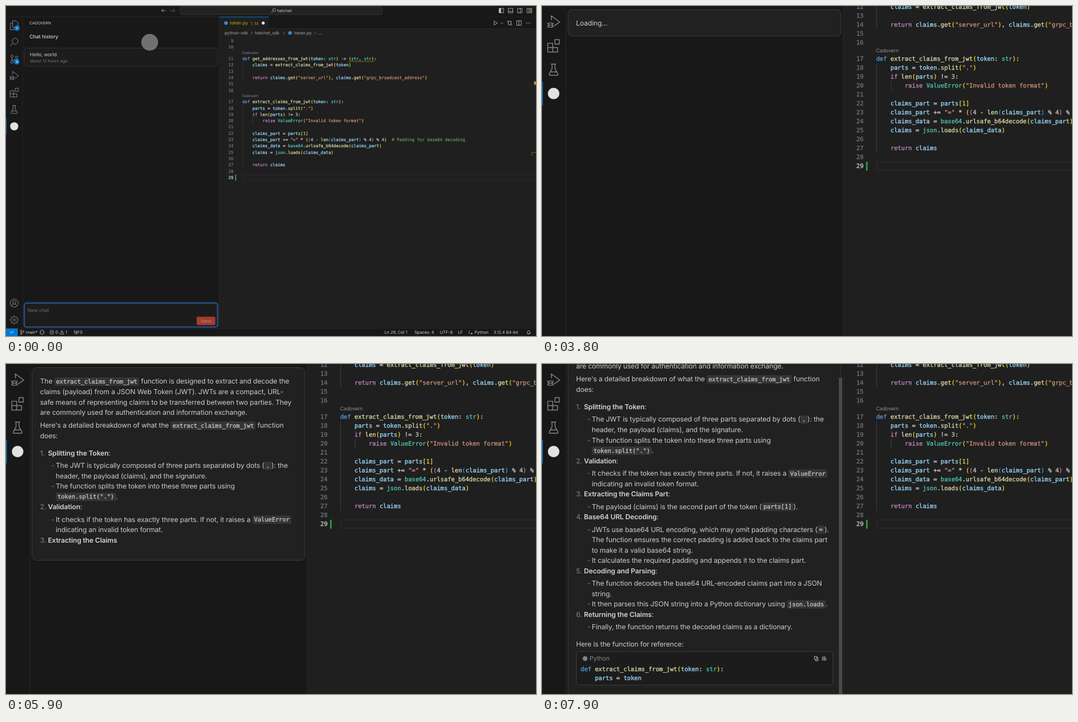
Animation, 948 px wide and 591 px high, one loop 8000 ms. Source, as an HTML page with a canvas:

```html
<!DOCTYPE html>
<html lang="en">
<head>
<meta charset="utf-8">
<title>Editor chat</title>
<style>
  html, body { margin: 0; width: 100%; height: 100%; overflow: hidden; background: #181818; }
  canvas { display: block; }
</style>
</head>
<body>
<canvas id="stage" width="948" height="591"></canvas>
<script>
const W = 948, H = 591, LOOP = 8000, STEP = 100;
const CUT = 3700, ANSWER = 3900;
const out = document.getElementById('stage').getContext('2d');
const buf = document.createElement('canvas');
buf.width = W;
buf.height = H;
const ctx = buf.getContext('2d');

const UI = 'Inter, "Open Sans", sans-serif';
const MONO = '"DejaVu Sans Mono", monospace';
const BRAND = 'Cadovern';
const BLUE = '#0078d4', LINE = '#2b2b2b', DIM = '#868686', TEXT = '#cccccc';

const clamp = v => Math.max(0, Math.min(1, v));

// Linear value at time t from [time, value] pairs
function track(t, keys) {
  if (t <= keys[0][0]) return keys[0][1];
  for (let i = 1; i < keys.length; i++) {
    const [a, va] = keys[i - 1], [b, vb] = keys[i];
    if (t <= b) return va + (vb - va) * (t - a) / (b - a);
  }
  return keys[keys.length - 1][1];
}

/* ---------- drawing helpers ---------- */

function rect(x, y, w, h, color) {
  ctx.fillStyle = color;
  ctx.fillRect(x, y, w, h);
}

function box(x, y, w, h, r, fill, stroke, lw = 1) {
  ctx.beginPath();
  ctx.roundRect(x, y, w, h, r);
  if (fill) { ctx.fillStyle = fill; ctx.fill(); }
  if (stroke) { ctx.strokeStyle = stroke; ctx.lineWidth = lw; ctx.stroke(); }
}

function dot(x, y, r, color) {
  ctx.beginPath();
  ctx.arc(x, y, r, 0, 7);
  ctx.fillStyle = color;
  ctx.fill();
}

// Text centred vertically on y; returns its width
function text(str, x, y, size, color = TEXT, { weight = 400, mono = false, align = 'left' } = {}) {
  ctx.font = `${weight} ${size}px ${mono ? MONO : UI}`;
  ctx.letterSpacing = mono ? '0px' : `${-0.01 * size}px`;
  ctx.textRendering = 'geometricPrecision';
  ctx.textAlign = align;
  ctx.fillStyle = color;
  ctx.fillText(str, x, y + size * 0.36);
  if (mono) {
    // a hairline outline gives code its slightly heavier look
    ctx.strokeStyle = color;
    ctx.lineWidth = size * 0.03;
    ctx.strokeText(str, x, y + size * 0.36);
  }
  return ctx.measureText(str).width;
}

const circ = (x, y, r) => `M${x - r} ${y}a${r} ${r} 0 1 0 ${2 * r} 0a${r} ${r} 0 1 0 ${-2 * r} 0`;

function icon(d, x, y, color = DIM, lw = 1, scale = 1) {
  ctx.save();
  ctx.translate(x, y);
  ctx.scale(scale, scale);
  ctx.strokeStyle = color;
  ctx.lineWidth = lw / scale;
  ctx.lineJoin = 'round';
  ctx.stroke(new Path2D(d));
  ctx.restore();
}

function gearPath() {
  let d = '';
  for (let i = 0; i < 32; i++) {
    const r = i % 4 < 2 ? 7.2 : 5.3, a = (i - 0.5) * Math.PI / 16;
    d += `${i ? 'L' : 'M'}${r * Math.cos(a)} ${r * Math.sin(a)}`;
  }
  return d + 'Z' + circ(0, 0, 2);
}

const ICON = {
  files: 'M-2.5 -7H3L6 -4V3.5H-2.5ZM-2.5 -3.5H-6V7H2.5V3.5',
  search: circ(1.5, -1.5, 4.7) + 'M-2 2L-6.5 6.5',
  git: circ(-3.5, -4.5, 2) + circ(4, -2.5, 2) + circ(-3.5, 5, 2) + 'M-3.5 -2.5V3M4 -.5C4 2.5 -3 .5 -3.5 3',
  debug: 'M-2.5 -2V-7L7 0L.5 4.5' + circ(-3.5, 3.5, 2.6) + 'M-6 3.5H-1M-7.2 1L-5.5 2M-7.2 6L-5.5 5M.2 1L-1.5 2M.2 6L-1.5 5',
  blocks: 'M-6.5 -3H-1V2H4.5V7H-6.5ZM-1 2V7M-6.5 2H-1M1.5 -7H6.5V-2H1.5Z',
  beaker: 'M-2.8 -6.3H2.8M-1.7 -6.3V-1L-5 5Q-5.3 6.3 -4 6.3H4Q5.3 6.3 5 5L1.7 -1V-6.3M-3.4 2.5H3.4',
  user: circ(0, 0, 7.2) + circ(0, -1.4, 3) + 'M-4.6 5.5C-3.6 .4 3.6 .4 4.6 5.5',
  gear: gearPath(),
  left: 'M4 0H-4M-1 -3L-4 0L-1 3',
  right: 'M-4 0H4M1 -3L4 0L1 3',
  lens: circ(1, -1, 2.6) + 'M-1 1L-4 4',
  chevron: 'M-1.3 -2.6L1.3 0L-1.3 2.6',
  down: 'M-2 -1L0 1L2 -1',
  panel: 'M-4 -4H4V4H-4Z',
  branch: circ(-2, -2.8, 1.2) + circ(2.3, -1.6, 1.2) + circ(-2, 3, 1.2) + 'M-2 -1.6V1.8M2.3 -.4C2 1.4 -1.6 .2 -2 1.8',
  sync: 'M-3.2 -.6A3.2 3.2 0 0 1 3.2 -.6M3.2 .6A3.2 3.2 0 0 1 -3.2 .6M1.8 -1L3.2 .4L4.4 -1M-1.8 1L-3.2 -.4L-4.4 1',
  error: circ(0, 0, 3.5) + 'M-1.4 -1.4L1.4 1.4M1.4 -1.4L-1.4 1.4',
  warn: 'M0 -3.4L3.8 3.4H-3.8ZM0 -1.2V1.2M0 2V2.6',
  tower: circ(0, -1, .8) + 'M0 0L-2 3.8M0 0L2 3.8M-1.2 2.2H1.2M-1.8 .8A2.4 2.4 0 0 1 -1.8 -2.8M1.8 .8A2.4 2.4 0 0 0 1.8 -2.8M-3 2A4 4 0 0 1 -3 -3.8M3 2A4 4 0 0 0 3 -3.8',
  remote: 'M-2.8 -1.6L-.4 .6L-2.8 2.8M2.8 -2.8L.4 -.6L2.8 1.6',
  bell: 'M-3 2.2C-2 1 -2.4 -3 0 -3.2C2.4 -3 2 1 3 2.2ZM-.8 3.4H.8',
  play: 'M-2.8 -3.6L3.2 0L-2.8 3.6Z',
  compare: circ(-2.5, -2.8, 1.2) + circ(2.5, 2.8, 1.2) + 'M-2.5 -1.5V3H.5M2.5 1.5V-3H-.5',
  copy: 'M-3 -4H1V1.5H-3ZM-1 1.5V4H3V-2H1',
  insert: 'M-3 -3.5V3.5M-1.5 -2.5H2M-1.5 0H3.5M-1.5 2.5H3.5'
};

/* ---------- code ---------- */

const CODE = `

def get_addresses_from_jwt(token: str) -> (str, str):
    claims = extract_claims_from_jwt(token)

    return claims.get("server_url"), claims.get("grpc_broadcast_address")


def extract_claims_from_jwt(token: str):
    parts = token.split(".")
    if len(parts) != 3:
        raise ValueError("Invalid token format")

    claims_part = parts[1]
    claims_part += "=" * ((4 - len(claims_part) % 4) % 4)  # Padding for base64 decoding
    claims_data = base64.urlsafe_b64decode(claims_part)
    claims = json.loads(claims_data)

    return claims

`.split('\n');

const TOKEN = /(#.*)|("[^"]*")|\b(def)\b|\b(return|if|raise)\b|\b(str|ValueError|base64|json)\b|(\w+)(?=\()|(\b\d+)|(\w+)|([()[\]])|(\S)/g;
const HUES = ['#6a9955', '#ce9178', '#569cd6', '#c586c0', '#4ec9b0', '#dcdcaa', '#b5cea8', '#9cdcfe', '', '#d4d4d4'];
const BRACKETS = ['#ffd700', '#da70d6', '#179fff'];
const CODE_SIZE = 7.53;

function codeLine(line, x, y, size) {
  let depth = 0;
  for (const m of line.matchAll(TOKEN)) {
    const kind = m.slice(1).findIndex(g => g !== undefined);
    let hue = HUES[kind];
    if (kind === 8) hue = BRACKETS['(['.includes(m[0]) ? depth++ : --depth];
    text(m[0], x + m.index * size * 0.602, y, size, hue, { mono: true });
  }
}

const lineY = n => n < 11 ? 62.4 + (n - 9) * 11.32
  : n < 17 ? 94.3 + (n - 11) * 11.32
  : 171.5 + (n - 17) * 11.32;

function editor() {
  rect(381, 19.5, W - 381, 558, '#1f1f1f');
  rect(470, 19.5, W - 470, 21, '#181818');
  rect(470, 40, W - 470, 0.7, LINE);
  rect(380.6, 19.5, 0.7, 558, LINE);
  rect(381, 19.2, 89, 1, BLUE);

  dot(393.5, 30.5, 3.3, '#3f86c0');
  text('token.py', 400.5, 30.5, 8.1, '#cca700');
  text('1, M', 437.5, 30.8, 7.5, '#a58a1c');
  dot(460, 30.5, 2.7, '#e4e4e4');
  icon(ICON.play, 876, 30.5, TEXT, 0.8);
  icon(ICON.down, 887, 30.8, TEXT, 0.7);
  icon(ICON.compare, 901, 30.5, TEXT, 0.8);
  icon(ICON.panel + 'M0 -4V4', 917.5, 30.5, TEXT, 0.8);
  for (const x of [931, 934, 937]) dot(x, 30.5, 0.7, TEXT);

  const crumb = '#a0a0a0';
  text('python-sdk', 391, 48.3, 7.9, crumb);
  text('hatchet_sdk', 445, 48.3, 7.9, crumb);
  text('token.py', 515.5, 48.3, 7.9, crumb);
  text('...', 558, 48.3, 7.9, crumb);
  for (const x of [439.5, 497.5, 553]) icon(ICON.chevron, x, 48.5, '#888', 0.8);
  dot(508, 48.3, 3.3, '#3f86c0');

  ctx.strokeStyle = '#2d2d2d';
  ctx.lineWidth = 0.8;
  ctx.strokeRect(423.4, 302.2, W, 10.6);
  for (const [x, a, b] of [[422.9, 12, 14], [422.9, 18, 27], [441.2, 20, 20]])
    rect(x, lineY(a) - 5.6, 0.7, lineY(b) - lineY(a) + 11.3, '#404040');

  text(BRAND, 422.5, 84, 6.35, '#8f8f8f');
  text(BRAND, 422.5, 161.2, 6.35, '#8f8f8f');
  CODE.forEach((line, i) => {
    const n = i + 9, y = lineY(n);
    text(n, 406.7, y, CODE_SIZE, n === 29 ? '#d0d0d0' : '#6e7681', { mono: true, align: 'right' });
    codeLine(line, 422.6, y, CODE_SIZE);
  });
  rect(409.9, 301.9, 1.9, 11.2, '#2ea043');

  ctx.beginPath();
  for (let x = 613; x <= 658.5; x += 0.5) ctx.lineTo(x, 99.4 + 0.8 * Math.sin((x - 613) * 1.6));
  ctx.strokeStyle = '#cca700';
  ctx.lineWidth = 0.7;
  ctx.stroke();

  rect(944.5, 135, 3.5, 6, '#b8932b');
  rect(940, 262, 8, 1, '#3d7a4a');
  rect(940, 263, 1, 6, '#3d7a4a');
}

/* ---------- window frame ---------- */

function titleBar() {
  rect(0, 19.2, W, 0.7, LINE);
  icon(ICON.left, 282, 8.2, '#a8a8a8', 0.9);
  icon(ICON.right, 298, 8.2, '#666', 0.9);
  box(311.5, 1, 361.5, 14.3, 3.5, '#222222', '#3a3a3a', 0.8);
  icon(ICON.lens, 478.5, 8.2, '#b5b5b5', 0.8);
  text('hatchet', 485, 8.2, 7.5, '#c0c0c0');
  icon(ICON.panel + 'M-1 -4V4', 886, 8.2, TEXT, 0.8);
  rect(882, 4.2, 3, 8, TEXT);
  icon(ICON.panel + 'M-4 1.5H4', 902.5, 8.2, TEXT, 0.8);
  icon(ICON.panel + 'M1 -4V4', 919, 8.2, TEXT, 0.8);
  icon('M-4 -4H-.5V4H-4ZM1.5 -4H4.5V-1H1.5ZM1.5 1H4.5V4H1.5Z', 936, 8.2, TEXT, 0.8);
}

function badge(n, x, y) {
  dot(x, y, 5, BLUE);
  text(n, x, y, 5.8, '#fff', { weight: 600, align: 'center' });
}

function activityBar() {
  rect(29.7, 19.5, 0.6, 558, LINE);
  ['files', 'search', 'git', 'debug', 'blocks', 'beaker'].forEach((name, i) =>
    icon(ICON[name], 14.6, 34.5 + i * 30.15, DIM, 1, 1.12));
  badge('1', 19.5, 39.5);
  badge('3', 19.2, 99.7);
  rect(0, 200.5, 1, 30, BLUE);
  dot(14.7, 215.5, 7.3, '#e2e2e2');
  icon(ICON.user, 14.7, 532, DIM, 1);
  icon(ICON.gear, 14.7, 562.3, DIM, 1);
}

function statusBar() {
  const y = 584.3;
  rect(0, 577.3, W, 14, '#181818');
  rect(0, 577.3, W, 0.6, LINE);
  rect(0, 577.5, 21, 14, BLUE);
  icon(ICON.remote, 10.3, y, '#fff', 0.7);
  icon(ICON.branch, 29, y, TEXT, 0.7);
  icon(ICON.sync, 64.5, y, TEXT, 0.8);
  icon(ICON.error, 82, y, TEXT, 0.7);
  icon(ICON.warn, 100, y, TEXT, 0.7);
  icon(ICON.tower, 126, y, TEXT, 0.7);
  for (const [s, x] of [['main*', 35.8], ['0', 88.3], ['1', 106.3], ['0', 132],
    ['Ln 29, Col 1', 677], ['Spaces: 4', 730.5], ['UTF-8', 776], ['LF', 808.5],
    ['Python', 838], ['3.12.4 64-bit', 872]]) text(s, x, y, 7.6);
  text('{', 827, y - 0.5, 7.6);
  dot(833, 586.5, 1.2, TEXT);
  icon(ICON.bell, 935, y, TEXT, 0.8);
}

/* ---------- chat history and prompt ---------- */

const PROMPT = 'Tell me what extract_claims_from_jwt function does';

function history(t) {
  text(BRAND.toUpperCase(), 42, 30.5, 7, TEXT);
  text('Chat history', 42, 54.7, 9, '#d4d4d4', { weight: 500 });
  box(32.5, 75.3, 345.3, 32.7, 5, '#1c1c1c', '#3a3a3a', 0.8);
  text('Hello, world', 42.8, 87, 8.7, TEXT);
  text('about 13 hours ago', 42.8, 98.5, 7.6, '#747474');

  box(30.7, 529.8, 349.8, 47.4, 6.5, null, '#333', 0.5);
  box(32.7, 532, 345.7, 42.9, 4.5, '#1c1c1c', '#284f87', 2.3);

  const n = Math.floor(track(t, [[150, 0], [1300, 16], [2900, 38], [3600, 50]]));
  if (n) {
    const w = text(PROMPT.slice(0, n), 38.9, 544.7, 8.7, TEXT);
    rect(39.4 + w, 539.5, 0.7, 10, '#e0e0e0');
  } else {
    text('New chat', 38.5, 544.7, 8.7, '#6f6f6f');
  }
  box(341, 556.5, 33.4, 15, 2, n ? '#f4513a' : '#a23c2e');
  text('Send', 357.7, 564.2, 7.5, n ? '#ffe9e4' : '#c98d84', { align: 'center' });

  const fade = 1 - clamp((t - 100) / 300);
  dot(257, 65, 15, `rgba(135,135,135,${0.8 * fade})`);
}

/* ---------- streamed answer ---------- */

// kind: p paragraph, h heading, s list entry, c its next line, l code header, k code
const ROWS = [
  ['p', 'The `extract_claims_from_jwt` function is designed to extract and decode the'],
  ['p', 'claims (payload) from a JSON Web Token (JWT). JWTs are a compact, URL-'],
  ['p', 'safe means of representing claims to be transferred between two parties. They'],
  ['p', 'are commonly used for authentication and information exchange.'],
  ['p', "Here's a detailed breakdown of what the `extract_claims_from_jwt` function", 23],
  ['p', 'does:'],
  ['h', 'Splitting the Token:', 31],
  ['s', 'The JWT is typically composed of three parts separated by dots (`.`): the'],
  ['c', 'header, the payload (claims), and the signature.'],
  ['s', 'The function splits the token into these three parts using'],
  ['c', '`token.split(".")`.'],
  ['h', 'Validation:'],
  ['s', 'It checks if the token has exactly three parts. If not, it raises a `ValueError`'],
  ['c', 'indicating an invalid token format.'],
  ['h', 'Extracting the Claims Part:'],
  ['s', 'The payload (claims) is the second part of the token (`parts[1]`).'],
  ['h', 'Base64 URL Decoding:'],
  ['s', 'JWTs use base64 URL encoding, which may omit padding characters (`=`).'],
  ['c', 'The function ensures the correct padding is added back to the claims part'],
  ['c', 'to make it a valid base64 string.'],
  ['s', 'It calculates the required padding and appends it to the claims part.'],
  ['h', 'Decoding and Parsing:'],
  ['s', 'The function decodes the base64 URL-encoded claims part into a JSON'],
  ['c', 'string.'],
  ['s', 'It then parses this JSON string into a Python dictionary using `json.loads`.'],
  ['h', 'Returning the Claims:'],
  ['s', 'Finally, the function returns the decoded claims as a dictionary.'],
  ['p', 'Here is the function for reference:', 31],
  ['l', 'Python', 25.5],
  ['k', 'def extract_claims_from_jwt(token: str):', 19.5],
  ['k', '    parts = token', 16]
];
const TOPS = [];
ROWS.forEach(([, , gap], i) => {
  const step = gap || (i && ROWS[i - 1][0] === 'h' ? 22.4 : 18.57);
  TOPS.push(i ? TOPS[i - 1] + step : 31);
});
const SIZE = 12.3, CHIP = 10.5, GREY = '#858585';
const ROW_KEYS = [[ANSWER, 0], [4750, 4.2], [5200, 8], [6300, 18.5], [6600, 20.188], [7200, 26], [7900, 31]];

function rich(str, x, y) {
  str.split('`').forEach((part, i) => {
    if (!part) return;
    if (i % 2) {
      const w = part.length * CHIP * 0.602 + 6.4;
      box(x, y - 7, w, 15, 3, '#353535');
      text(part, x + 3.2, y + 0.3, CHIP, '#c4c4c4', { mono: true });
      x += w;
    } else {
      x += text(part, x, y, SIZE);
    }
  });
}

// Cut at the end of the word being written
function written(str, part) {
  if (part >= 1) return str;
  const n = Math.round(str.length * part);
  const end = str.indexOf(' ', n);
  return n ? str.slice(0, end < 0 ? str.length : end) : '';
}

function answer(t) {
  if (t < ANSWER) {
    box(46.5, 6.5, 488.5, 47.5, 8, '#212121', '#3d3d3d');
    text('Loading...', 61, 30.5, SIZE);
    return;
  }
  const pos = track(t, ROW_KEYS);
  const last = Math.max(0, Math.min(ROWS.length, Math.ceil(pos)) - 1);
  // list entries sit closer until a second heading arrives
  const tight = last < 11 ? 3.5 : 0;
  const top = i => TOPS[i] - (i > 6 ? tight : 0);
  const bottom = top(last) + 36;
  const scroll = Math.max(0, bottom - 599);

  ctx.save();
  ctx.translate(0, -scroll);
  box(46.5, 6.5, 488.5, bottom - 6.5, 8, '#212121', '#3d3d3d');
  if (last >= 28) box(61.5, TOPS[28] - 12.5, 458.5, top(last) - TOPS[28] + 24.5, 6, '#1c1c1c', '#3d3d3d');

  let heading = 0;
  for (let i = 0; i <= last; i++) {
    const [kind, full] = ROWS[i], y = top(i);
    const str = written(full, pos - i);
    if (kind === 'h') {
      text(`${++heading}.`, 61, y, SIZE, GREY);
      const bold = str.replace(':', '');
      const w = text(bold, 75, y, SIZE, '#d4d4d4', { weight: 600 });
      if (str !== bold) text(':', 75 + w, y, SIZE);
    } else if (kind === 'l') {
      dot(77, y, 4.3, GREY);
      text(str, 85, y, 11, GREY);
      icon(ICON.copy, 490.5, y, '#a8a8a8', 1.2);
      icon(ICON.insert, 505, y, '#a8a8a8', 1.4);
    } else if (kind === 'k') {
      codeLine(str, 69, y - 0.4, CODE_SIZE * Math.SQRT2);
    } else {
      if (kind === 's') text('-', 81, y, SIZE, GREY);
      rich(str, kind === 'p' ? 61 : 89, y);
    }
  }
  ctx.restore();
  if (scroll) rect(531, -48 + 0.88 * scroll, 6, 700, '#4a4a4a');
}

/* ---------- camera and playback ---------- */

function zoom(t) {
  const p = clamp((t - 300) / 1340);
  return 1 + (p < 0.5 ? 4 * p ** 3 : 1 - 4 * (1 - p) ** 3);
}

function scene(t, camera) {
  const chat = t >= CUT;
  const s = chat ? Math.SQRT2 : camera;
  ctx.setTransform(1, 0, 0, 1, 0, 0);
  rect(0, 0, W, H, '#181818');
  ctx.setTransform(s, 0, 0, s, 0, chat ? -148 : H * (1 - s));
  titleBar();
  editor();
  activityBar();
  statusBar();
  if (chat) {
    ctx.setTransform(1, 0, 0, 1, 0, 0);
    answer(t);
  } else {
    history(t);
  }
}

// Averages several camera positions while zooming, as motion blur
function render(t) {
  const moving = t < CUT && zoom(t - 12) !== zoom(t + 12);
  const samples = moving ? 5 : 1;
  for (let i = 0; i < samples; i++) {
    scene(t, zoom(moving ? t - 12 + i * 6 : t));
    out.globalAlpha = 1 / (i + 1);
    out.drawImage(buf, 0, 0);
  }
}

const start = performance.now();
let shown = -1;
function tick() {
  const t = Math.floor((performance.now() - start) % LOOP / STEP) * STEP;
  if (t !== shown) render(shown = t);
  requestAnimationFrame(tick);
}
tick();
</script>
</body>
</html>
```
